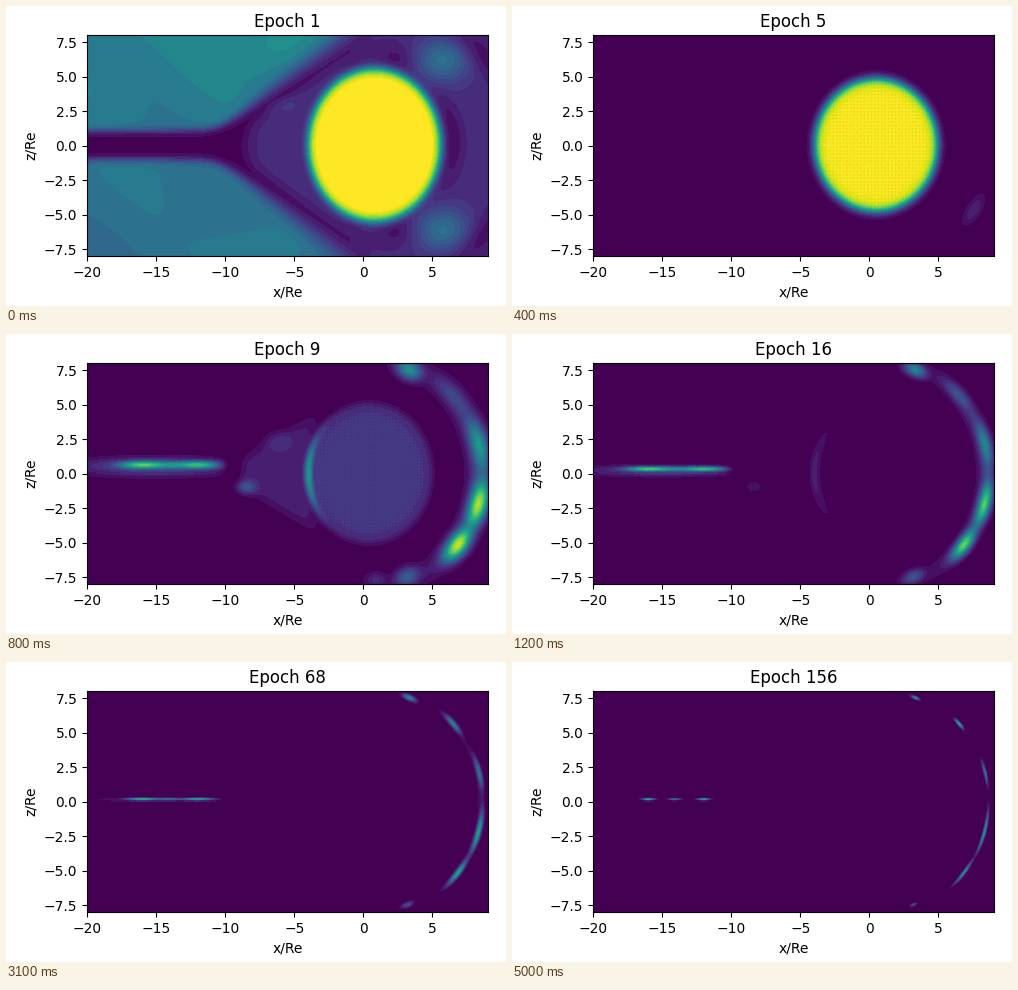
These frames come from a looping animation (500x300 px, 5.1 s). A matplotlib script:

```python
import numpy as np
import matplotlib.pyplot as plt
from matplotlib.animation import FuncAnimation

W, H = 500, 300
FRAMES, INTERVAL = 51, 100
LEFT, RIGHT, TOP, BOTTOM = 81.15, 481.75, 29.1, 250.1
COLS, ROWS, LEVELS = 401, 221, 25

x, z = np.meshgrid(-20 + 29 * (np.arange(COLS) + 0.5) / COLS,
                   8 - 16 * (np.arange(ROWS) + 0.5) / ROWS)
r = np.hypot(x, z)
theta = np.degrees(np.arctan2(z, x))


def epoch(n):
    """Epochs are logged ever more sparsely: the step grows every ten frames."""
    return sum(1 + i // 10 for i in range(n + 1))


def sigmoid(v):
    return 1 / (1 + np.exp(-np.clip(v, -60, 60)))


def softplus(v):
    return np.logaddexp(0, v)


def mix(a, b, u):
    return a + (b - a) * u


def spot(amp, cx, cz, sx, sz):
    return amp * np.exp(-((x - cx) / sx) ** 2 / 2 - ((z - cz) / sz) ** 2 / 2)


def arc_spot(amp, angle, radius, s_angle, s_radius):
    return amp * np.exp(-((theta - angle) / s_angle) ** 2 / 2
                        - ((r - radius) / s_radius) ** 2 / 2)


def ellipse(cx, rx, rz):
    return np.hypot((x - cx) / rx, z / rz)


def first_guess():
    """Lobes, thin dark sheet and flaring cavity around the disk."""
    flare = 0.6 * softplus((x + 10.5) / 0.6)
    edge = 1.02 + 0.76 * flare
    ripple = 0.02 * np.sin(0.6 * x + 0.4 * z) + 0.005 * z
    ripple += spot(0.06, -6.5, 7, 2.5, 1.5) + spot(0.08, -8, -7.5, 2.5, 1.2)
    lobes = (0.385 + ripple) * sigmoid((abs(z) - edge) / (0.17 + 0.06 * flare))

    cavity = 0.11 * sigmoid((edge - 1.3 - abs(z)) / 0.3) * sigmoid((x + 8.4) / 0.3)
    cavity += spot(0.05, -6, 2.9, 1.2, 0.5)

    day = 0.12 * sigmoid((x + 1) / 0.8)
    day -= arc_spot(0.09, 4, 6.5, 22, 0.55)
    for side in (1, -1):
        day -= arc_spot(0.1, 39 * side, 10.7, 10, 0.7)
        day -= arc_spot(0.08, 68 * side, 6.6, 9, 0.9)
        day += spot(0.23, 5.7, 6.1 * side, 1.4, 1.1)
    return np.maximum(np.maximum(lobes, cavity * sigmoid(-x)), day) + 0.02


def wisps():
    """Bright bow of the disk and the faint haze trailing behind it."""
    bow = (0.5 * np.exp(-((ellipse(0.43, 4.55, 5.1) - 0.97) / 0.075) ** 2
                        - (z / 2.8) ** 2) * (x < 0))
    haze = 0.1 * sigmoid((1.2 + 0.6 * (x + 8.5) - abs(z)) / 0.3)
    haze *= sigmoid((x + 8.8) / 0.2) * sigmoid(-(x + 3.5) / 0.3)
    haze += spot(0.22, -8.5, -1, 0.5, 0.35) + spot(0.08, -6.2, 2.3, 0.7, 0.5)
    return np.hypot(bow, haze) + spot(0.13, 0.9, -7.7, 0.6, 0.4)


# Magnetopause spots: angle, first and last angular spread, first and last amplitude
ARC = [(66, 5, 1.5, 0.5, 0.5), (40.6, 9, 2, 0.2, 0.6), (13.4, 10, 4, 0.5, 0.38),
       (-15, 9, 7, 0.85, 0.5), (-37, 7, 4.5, 0.9, 0.5), (-67, 5, 1.2, 0.3, 0.25)]


def magnetopause(u):
    """Energy in the arc, squared; spots shrink as u runs from 0 to 1."""
    width = 0.5 * 0.16 ** u
    dip = 1 - 0.35 * np.exp(-((u - 0.45) / 0.2) ** 2)
    total = arc_spot(0.2 * (1 - u), 0, 8.45, 42, 1.3 * width) ** 2
    for angle, s0, s1, a0, a1 in ARC:
        total += arc_spot(dip * mix(a0, a1, u), angle, 8.6 - 2.4e-8 * angle ** 4,
                          mix(s0, s1, u), width) ** 2
    return total


def tail(u):
    """Current sheet, squared: it sinks, thins and breaks into three streaks."""
    height = 0.1 + 0.45 * 0.005 ** u
    thick = 0.045 + 0.18 * 0.03 ** u
    length = 1.3 - u ** 2
    total = spot(0.24 * (1 - u), -15, height - 0.1 * (1 - u), 4, 2 * thick) ** 2
    for cx, amp in ((-16, 0.7), (-14.1, 0.4), (-12, 0.65)):
        total += spot(amp, cx, height, length, thick) ** 2
    return total * sigmoid(-(x + 10.1) * 5) ** 2


GUESS, WISPS = first_guess(), wisps()
SMUDGE = arc_spot(0.115, -31.7, 8.87, 5.9, 0.38)
GRID = np.cos(8 * np.pi * x) + np.cos(8 * np.pi * z)


def disk(n):
    def key(*values):
        return np.interp(n, [0, 4, 8], values)

    amp = np.interp(n, [0, 4, 8, 13], [1.01, 0.968, 0.166, 0])
    rho = ellipse(key(0.78, 0.48, 0.43), key(4.8, 4.42, 4.5), key(5.5, 4.75, 5.0))
    grain = 1 + key(0, 0.012, 0.02) * GRID
    return amp * grain * sigmoid((1 - rho) / 0.043)


def field(n):
    total = disk(n) ** 2
    total += (GUESS * np.interp(n, [0, 3], [1, 0])) ** 2
    total += (SMUDGE * np.interp(n, [2, 4, 6], [0, 1, 0])) ** 2
    total += (WISPS * np.interp(n, [4, 8, 13], [0, 1, 0])) ** 2
    u = np.interp(np.log(epoch(n)), np.log([9, 156]), [0, 1])
    gain = np.interp(n, [4, 8], [0, 1])
    total += gain ** 2 * (magnetopause(u) + tail(u))
    steps = np.floor(np.sqrt(total) * LEVELS)
    return np.clip(steps / (LEVELS - 1), 0, 1)


fig = plt.figure(figsize=(W / 100, H / 100), dpi=100)
ax = fig.add_axes([LEFT / W, 1 - BOTTOM / H, (RIGHT - LEFT) / W, (BOTTOM - TOP) / H])
image = ax.imshow(field(0), extent=(-20, 9, -8, 8), aspect="auto", cmap="viridis",
                  vmin=0, vmax=1, interpolation="nearest")
ax.set_xticks(np.arange(-20, 6, 5))
ax.set_yticks(np.arange(-7.5, 8, 2.5))
ax.set_xlabel("x/Re")
ax.set_ylabel("z/Re")
title = ax.set_title("Epoch 1")


def update(n):
    image.set_data(field(n))
    title.set_text(f"Epoch {epoch(n)}")
    return image, title


anim = FuncAnimation(fig, update, frames=FRAMES, interval=INTERVAL,
                     repeat=True, repeat_delay=0)
plt.show()
```
